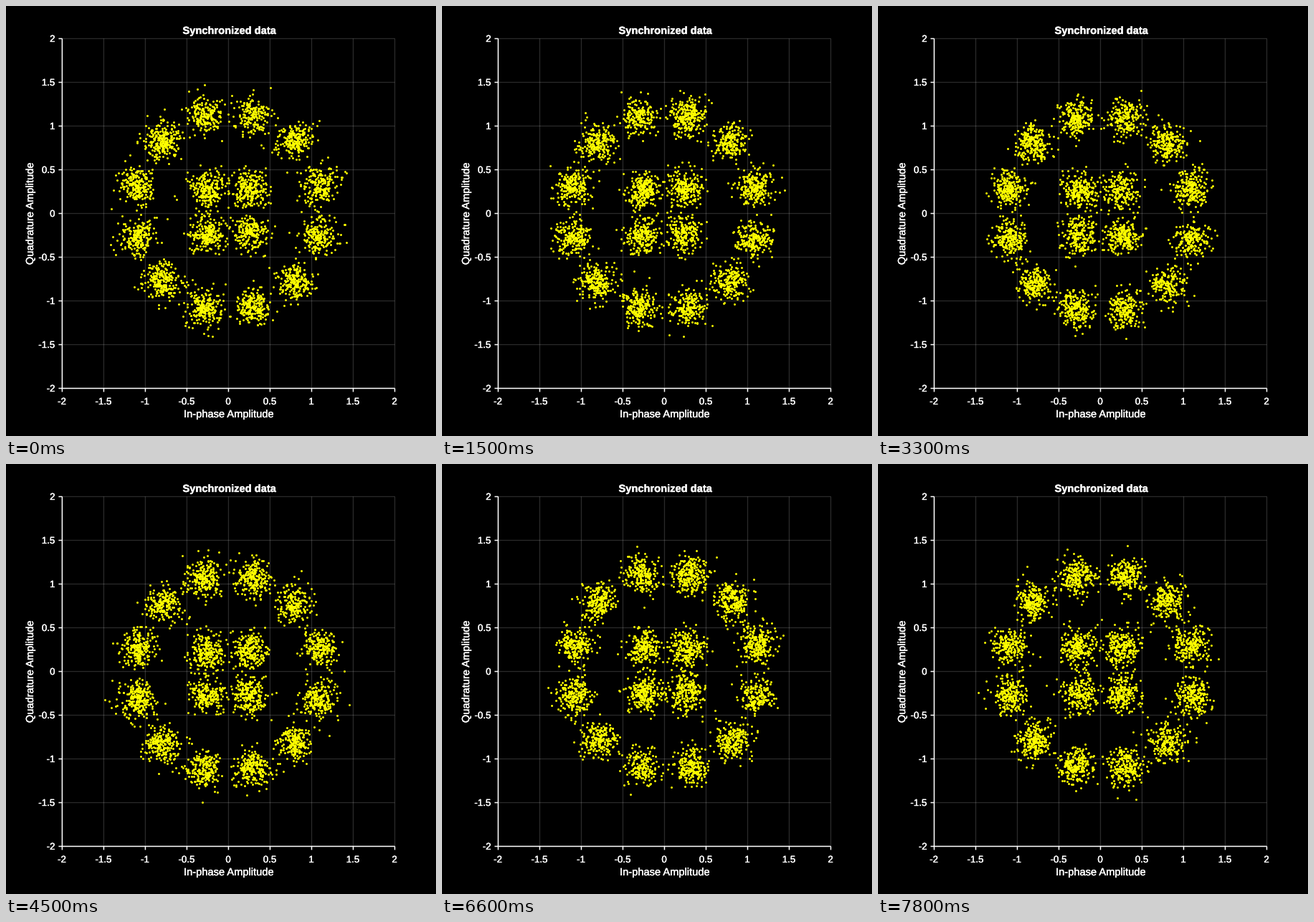
These frames come from a looping animation (600x600 px, 8 s). A matplotlib script:

```python
import numpy as np
import matplotlib.pyplot as plt
from matplotlib.animation import FuncAnimation
from matplotlib.patheffects import Normal, Stroke

SIZE, DPI = 600, 100
PX = 72 / DPI  # points per pixel
LEFT, RIGHT, TOP, BOTTOM = 78.4, 542.5, 45.5, 533.5
TICK_MS, HOLD_TICKS, TICKS = 100, 3, 80
POINTS = 3500
GRID = (1, 1, 1, 0.17)

plt.rcParams["font.family"] = "Liberation Sans"

fig = plt.figure(figsize=(SIZE / DPI, SIZE / DPI), dpi=DPI, facecolor="black")
ax = fig.add_axes([0, 0, 1, 1])
ax.set(xlim=(0, SIZE), ylim=(SIZE, 0))
ax.axis("off")


def to_px(x, y):
    """Convert plot values in -2..2 to stage pixels."""
    return (LEFT + (x + 2) / 4 * (RIGHT - LEFT),
            BOTTOM - (y + 2) / 4 * (BOTTOM - TOP))


def line(xs, ys, color, width, z):
    ax.plot(xs, ys, color=color, lw=width * PX, zorder=z,
            solid_capstyle="butt", snap=False)


def label(x, y, text, size, ha="center", **style):
    # A hairline outline gives the text its slightly heavier weight.
    outline = [Stroke(linewidth=0.35 * PX, foreground="white"), Normal()]
    ax.text(x, y, text, color="white", fontsize=size * PX, ha=ha,
            va="baseline", rotation_mode="anchor", path_effects=outline,
            **style)


def draw_axes():
    for v in np.arange(-2, 2.5, 0.5):
        x, y = to_px(v, v)
        line([x, x], [TOP, BOTTOM], GRID, 1.33, 1)
        line([LEFT, RIGHT], [y, y], GRID, 1.33, 1)
        line([x, x], [BOTTOM, BOTTOM + 5], "white", 1.5, 3)
        line([LEFT - 5, LEFT], [y, y], "white", 1.5, 3)
        label(x - 0.4, 556, f"{v:g}", 13.33)
        label(68.5, y + 4.5, f"{v:g}", 13.33, ha="right")
    line([LEFT, LEFT], [TOP, BOTTOM + 0.7], "white", 1.5, 3)
    line([LEFT - 0.7, RIGHT], [BOTTOM, BOTTOM], "white", 1.5, 3)
    label(311.5, 39, "Synchronized data", 14.67, weight="bold")
    label(311, 574, "In-phase Amplitude", 14.67)
    label(38, 289.5, "Quadrature Amplitude", 14.67, rotation=90)


def ring(radius, count):
    angles = (np.arange(count) + 0.5) * 2 * np.pi / count
    return radius * np.exp(1j * angles)


# 16-APSK: 4 inner and 12 outer symbols, ring ratio 3.15, unit mean power
INNER = 0.36
SYMBOLS = np.concatenate([ring(INNER, 4), ring(3.15 * INNER, 12)])

# Slow drift of the constellation centre
DRIFT_AT = [0, 3, 8, 15, 19, 22, 26]
DRIFT_X = [-0.005, -0.02, 0.0, 0.0, 0.01, 0.01, 0.0]
DRIFT_Y = [0.025, 0.02, 0.015, -0.025, 0.015, 0.012, 0.008]


def received(block):
    """Noisy symbols of one block, with a few wider strays."""
    rng = np.random.default_rng(100 + block)
    sent = SYMBOLS[rng.integers(len(SYMBOLS), size=POINTS)]
    spread = np.where(rng.random(POINTS) < 0.03, 0.135, 0.105)
    noise = spread * (rng.normal(size=POINTS) + 1j * rng.normal(size=POINTS))
    drift = (np.interp(block, DRIFT_AT, DRIFT_X)
             + 1j * np.interp(block, DRIFT_AT, DRIFT_Y))
    return sent + noise + drift


draw_axes()
dots, = ax.plot([], [], "o", color="yellow", ms=2.95 * PX, mew=0, zorder=4)


def update(tick):
    z = received(tick // HOLD_TICKS)
    dots.set_data(*to_px(z.real, z.imag))
    return dots,


anim = FuncAnimation(fig, update, frames=TICKS, interval=TICK_MS,
                     repeat=True, repeat_delay=0, blit=False)
plt.show()
```
